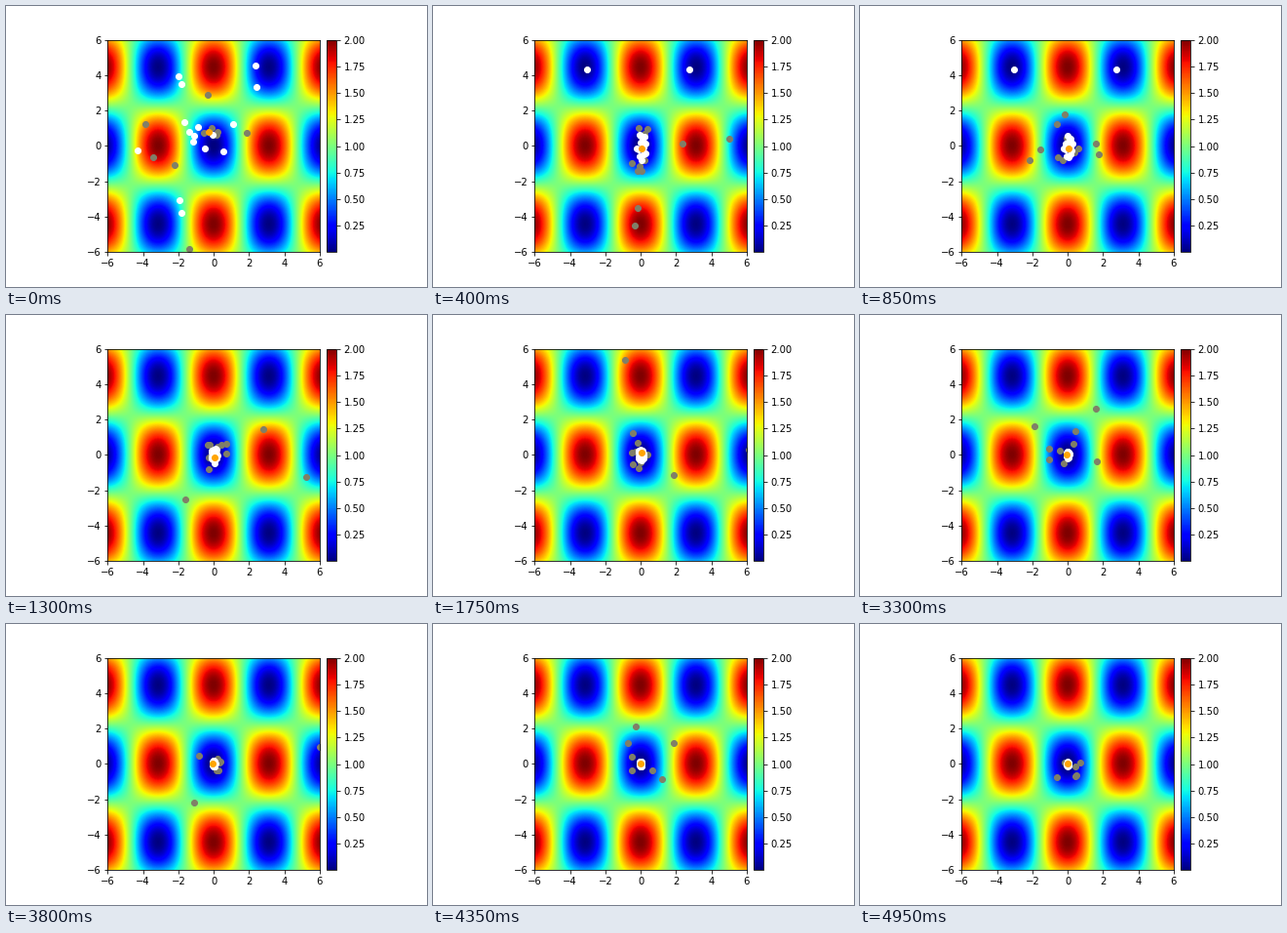
Animation, 432 px wide and 288 px high, one loop 5000 ms. Source, as a matplotlib script:

```python
import numpy as np
import matplotlib.pyplot as plt
from matplotlib.animation import FuncAnimation

FRAMES, INTERVAL = 100, 50
LIMIT = 6

# Opening positions; the first two agents get caught in the outer minima.
START = np.array([
    (-2.0, 3.95), (2.38, 4.55), (-1.83, 3.5), (2.42, 3.35),
    (-1.65, 1.35), (-0.9, 1.05), (-1.4, 0.8), (-1.1, 0.55),
    (-1.17, 0.25), (-0.07, 0.63), (1.1, 1.23), (-0.5, -0.16),
    (0.55, -0.32), (-4.3, -0.26), (-1.93, -3.06), (-1.82, -3.78),
])
FIRST_BEST = (-0.26, 0.8)
TRAPS = [(-3.05, 4.3), (2.75, 4.3)]
TRAPPED, RELEASED = 5, 24


def griewank(x, y):
    return 1 + (x**2 + y**2) / 4000 - np.cos(x) * np.cos(y / np.sqrt(2))


def spread(step):
    return 0.1 + 0.75 * np.exp(-step / 28)


def nest_shape(count):
    """Points of a spiral that fill a tall ellipse, outermost first."""
    index = np.arange(count)
    radius = np.sqrt((count - index - 0.5) / count)
    angle = index * np.pi * (3 - np.sqrt(5))
    return np.column_stack([0.45 * radius * np.cos(angle) + 0.05,
                            radius * np.sin(angle) - 0.05])


def run_swarm(seed=11):
    """Agents hop into a shrinking ellipse; trial points scatter around them."""
    rng = np.random.default_rng(seed)
    count = len(START)
    nest = nest_shape(count)
    agents, best = START.copy(), FIRST_BEST
    history = []
    for step in range(FRAMES):
        if step:
            reach = np.hypot(agents[:, 0] / 0.45, agents[:, 1])
            hop = (reach > 1.2 * spread(step)) & (rng.random(count) < 0.3)
            hop[:2] &= step > RELEASED
            agents[hop] = nest[hop] * spread(step)
            if step == TRAPPED:
                agents[:2] = TRAPS
            best = agents[griewank(*agents.T).argmin()].copy()
        jump = 0.55 * rng.standard_cauchy((count, 2)).clip(-30, 30)
        shown = round(13 - 6 * (step / FRAMES) ** 2)
        history.append(((agents + jump)[-shown:], agents.copy(), [best]))
    return history


history = run_swarm()

plt.rcParams.update({"font.family": "DejaVu Sans", "font.size": 10,
                     "figure.subplot.bottom": 0.125})
fig, ax = plt.subplots(figsize=(6, 4), dpi=72, facecolor="white")
axis = np.linspace(-LIMIT, LIMIT, 400)
field = ax.imshow(griewank(*np.meshgrid(axis, axis)), cmap="jet",
                  origin="lower", extent=[-LIMIT, LIMIT] * 2,
                  interpolation="bilinear", vmin=0.002, vmax=2.0025)
ticks = range(-LIMIT, LIMIT + 1, 2)
ax.set(xlim=(-LIMIT, LIMIT), ylim=(-LIMIT, LIMIT), xticks=ticks, yticks=ticks)
fig.colorbar(field, ax=ax, fraction=0.18, pad=0.02,
             ticks=np.arange(0.25, 2.01, 0.25), format="%.2f")

# Trial points, agents and the best agent, from back to front.
layers = [ax.scatter([], [], s=36, color=color, zorder=2 + i / 10)
          for i, color in enumerate(["#807f68", "white", "orange"])]


def draw(step):
    for layer, points in zip(layers, history[step]):
        layer.set_offsets(points)
    return layers


anim = FuncAnimation(fig, draw, frames=FRAMES, interval=INTERVAL,
                     repeat=True, repeat_delay=0)
plt.show()
```
